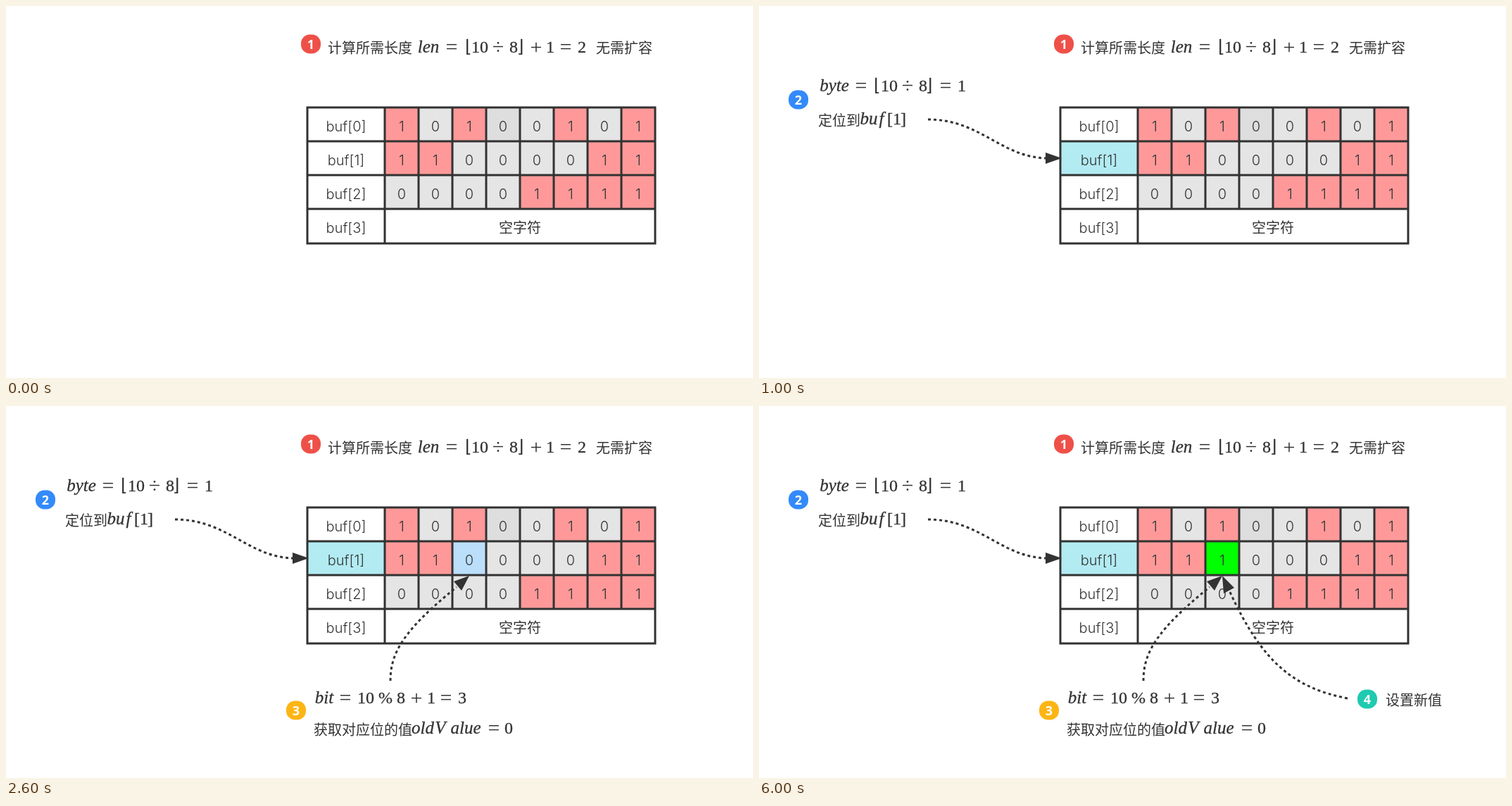
An HTML page for the animation above (8 s loop, 1061 by 528 pixels).

```html
<!DOCTYPE html>
<html lang="zh-CN">
<head>
<meta charset="utf-8">
<style>
  html, body { margin: 0; width: 100%; height: 100%; overflow: hidden; background: #fff; }
  svg { display: block; }
  text { fill: #333; text-anchor: middle; }
  .cell { font: 300 20px Inter, sans-serif; }
  .cjk { font: 20px "Noto Sans CJK SC", "Noto Sans CJK", sans-serif; text-anchor: start; }
  .bold { font-weight: 500; }
  .num { font: 24px "Liberation Serif", serif; stroke: #333; stroke-width: .3; }
  .var { font: italic 25px "Liberation Serif", serif; stroke: #333; stroke-width: .3; }
  .op { font: 30px "Liberation Serif", serif; }
  .floor { font: 25px "DejaVu Sans", sans-serif; }
  .badge { font: bold 18px "Open Sans", sans-serif; fill: #fff; }
  .dots { fill: none; stroke: #333; stroke-width: 3; stroke-dasharray: 4 4; }
</style>
</head>
<body>
<svg width="1061" height="528" viewBox="0 0 1061 528"></svg>
<script>
const svg = document.querySelector('svg');
const layers = [];

function add(parent, tag, attrs, content = '') {
  const el = document.createElementNS('http://www.w3.org/2000/svg', tag);
  for (const key in attrs) el.setAttribute(key, attrs[key]);
  el.textContent = content;
  parent.append(el);
  return el;
}
const label = (parent, content, x, y, cls) => add(parent, 'text', { x, y, class: cls }, content);
const box = (parent, x, y, width, fill) => add(parent, 'rect', { x, y, width, height: 48, fill });

function tokenClass(token) {
  if (/[⌊⌋]/.test(token)) return 'floor';
  if (/[=+÷]/.test(token)) return 'op';
  return /[a-z]/i.test(token) ? 'var' : 'num';
}
// Each token is centred on its own x.
function formula(parent, y, tokens, xs) {
  tokens.split(' ').forEach((token, i) => {
    const cls = tokenClass(token);
    label(parent, token, xs[i], y + (cls === 'op' ? 1.5 : 0), cls);
  });
}
function badge(parent, n, x, y, fill) {
  add(parent, 'rect', { x: x - 14, y: y - 13.5, width: 28, height: 27, rx: 12.5, fill });
  label(parent, n, x, y + 6.5, 'badge');
}
function arrow(parent, path, head) {
  add(parent, 'path', { d: path, class: 'dots' });
  add(parent, 'polygon', { points: head, fill: '#333' });
}

// Cell fills, then the layers' highlights, then lines and text above them.
const fills = add(svg, 'g');
const marks = [0, 1, 2, 3].map(() => add(svg, 'g'));
const table = add(svg, 'g');
for (let i = 0; i < 4; i++) layers.push(add(svg, 'g'));

const target = [];
['10100101', '11000011', '00001111'].forEach((bits, row) => {
  [...bits].forEach((bit, col) => {
    const shade = row === 0 && col === 3 ? '#dedede' : '#e5e5e5';
    box(fills, 538 + 48 * col, 144 + 48 * row, 48, bit === '1' ? '#ff9999' : shade);
    const text = label(table, bit, 562 + 48 * col, 178 + 48 * row, 'cell');
    if (row === 1 && col === 2) target.push(text);
  });
});
for (let row = 0; row < 4; row++) label(table, `buf[${row}]`, 483, 178 + 48 * row, 'cell');
label(table, '空字符', 700, 322, 'cjk');
add(table, 'path', {
  d: 'M428 144H922V337H428ZM428 192H922M428 240H922M428 288H922M538 144V337' +
    [1, 2, 3, 4, 5, 6, 7].map(i => `M${538 + 48 * i} 144V288`).join(''),
  fill: 'none', stroke: '#323232', 'stroke-width': 3
});

box(marks[1], 428, 192, 110, '#b2ebf2');
box(marks[2], 634, 192, 48, '#bbdefb');
box(marks[3], 634, 192, 48, '#00ff00');

const [size, locate, read, write] = layers;

badge(size, 1, 433, 54, '#ee5048');
label(size, '计算所需长度', 457, 67, 'cjk bold');
formula(size, 66, 'len = ⌊ 10 ÷ 8 ⌋ + 1 = 2', [600, 633, 657, 673, 699, 721, 731, 753, 773, 795, 818]);
label(size, '无需扩容', 838, 67, 'cjk bold');

badge(locate, 2, 56, 133, '#338af9');
formula(locate, 121, 'byte = ⌊ 10 ÷ 8 ⌋ = 1', [107, 145, 168, 185, 211, 233, 242, 265, 288]);
label(locate, '定位到', 84, 170, 'cjk');
formula(locate, 168, 'bu f [ 1 ]', [156, 174, 186, 196, 205]);
arrow(locate, 'M240 161C315 161 345 216 410 216', '430,216 407,208 407,224');

badge(read, 3, 412, 432, '#fdb515');
formula(read, 422, 'bit = 10 % 8 + 1 = 3', [452, 482, 511, 539, 561, 583, 604, 625, 648]);
label(read, '获取对应位的值', 437, 467, 'cjk');
formula(read, 465, 'old V alue = 0', [592, 617, 653, 693, 714]);
arrow(read, 'M546 390C546 350 565 318 640 257', '658,241 647,262 636,249');

badge(write, 4, 864, 416, '#1fcab0');
label(write, '设置新值', 890, 425, 'cjk');
arrow(write, 'M836 415C760 400 715 365 668 262', '658,241 675,258 660,266');

function draw() {
  const step = Math.min(3, Math.floor(performance.now() % 8000 / 1000));
  for (const group of [layers, marks]) {
    group.forEach((g, i) => g.setAttribute('visibility', i <= step ? 'visible' : 'hidden'));
  }
  target[0].textContent = step === 3 ? 1 : 0;
  requestAnimationFrame(draw);
}
draw();
</script>
</body>
</html>
```
